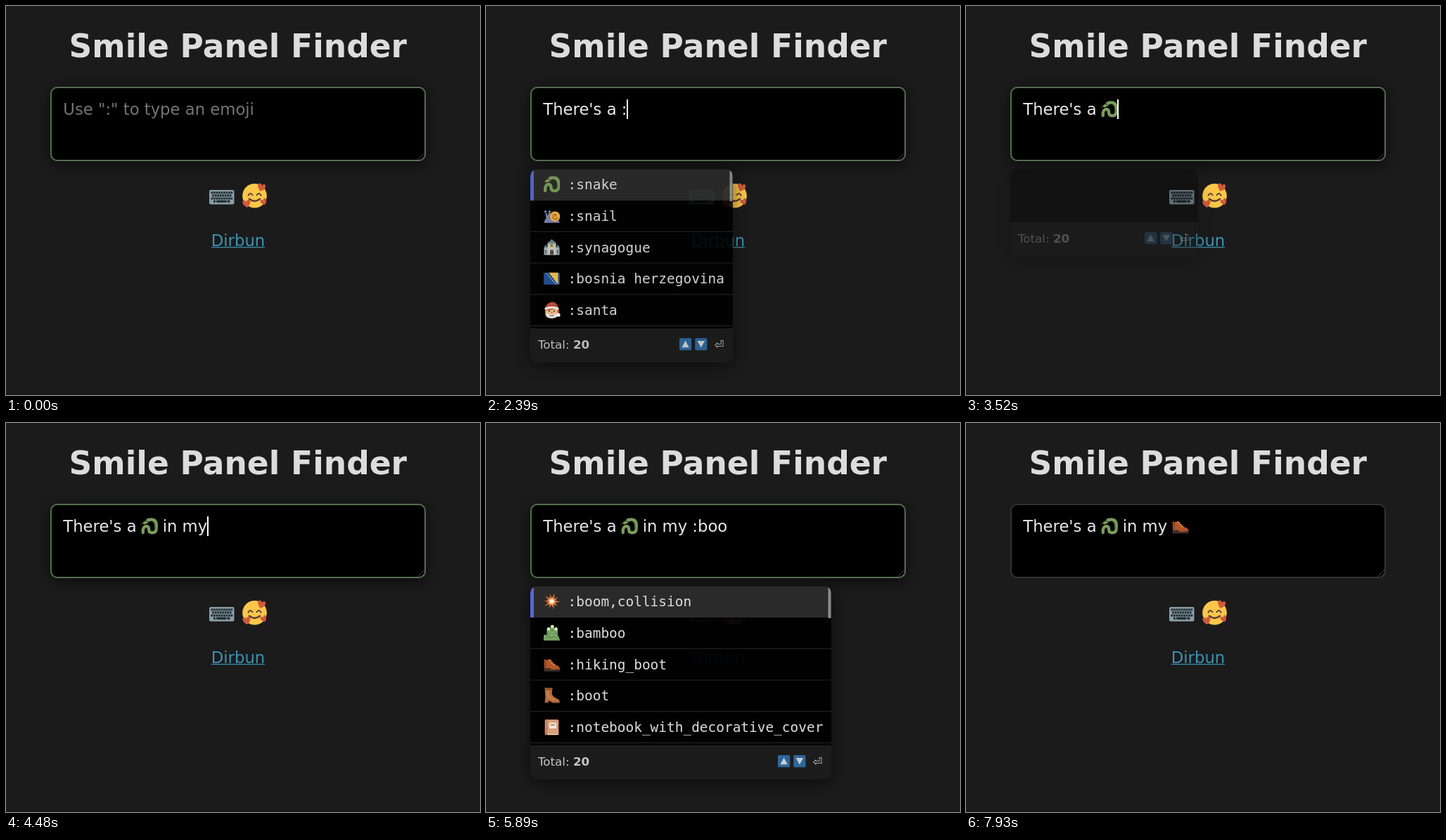
Write an HTML page that moves like this. It is 674 px wide and 554 px high and loops after 7980 ms.

```html
<!DOCTYPE html>
<html lang="en">
<head>
<meta charset="utf-8">
<title>Smile Panel Finder</title>
<style>
html, body { margin: 0; width: 100%; height: 100%; overflow: hidden; background: #1b1b1b; }
svg { display: block; width: 674px; height: 554px; }
text { font-family: "DejaVu Sans", sans-serif; white-space: pre; }
.field { font-size: 22.72px; }
.mono { font: 19.45px "DejaVu Sans Mono", monospace; fill: #dcdcdc; }
.foot { font-size: 16.7px; fill: #c6c6c6; }
</style>
</head>
<body>
<svg viewBox="0 0 674 554">
  <defs id="defs">
    <filter id="shadow" x="-20%" y="-40%" width="140%" height="190%">
      <feDropShadow dx="0" dy="4" stdDeviation="11.5" flood-color="#000" flood-opacity=".6"/>
    </filter>
    <path id="heart" d="M0 5.8 C-8 0 -6 -6 -2.5 -5 Q-.5 -4.5 0 -2.5 Q.5 -4.5 2.5 -5 C6 -6 8 0 0 5.8Z"/>
  </defs>
  <rect width="674" height="554" fill="#1b1b1b"/>
  <rect y="552" width="674" height="2" fill="#181818"/>
  <text x="329.8" y="72.5" text-anchor="middle" font-size="45.5" font-weight="bold" fill="#dcdcdc">Smile Panel Finder</text>

  <rect id="box" x="64" y="116" width="532" height="104" rx="9" fill="#000" stroke-width="2"/>
  <path d="M585 219 L596 208 M590.5 219 L596 213.5" stroke="#484848" stroke-width=".9"/>
  <text id="hint" class="field" x="81.3" y="155" fill="#757575">Use ":" to type an emoji</text>
  <g id="typed"></g>
  <rect id="caret" y="133" width="2" height="28" fill="#fff"/>

  <g id="keyboard"></g>
  <g transform="translate(353.5 270.3)">
    <circle r="17.3" fill="#fcc748"/>
    <g fill="none" stroke="#5d4037" stroke-width="2" stroke-linecap="round">
      <path d="M-9 -.5 Q-6.3 -6 -3 -1 M3 -1 Q6.3 -6 9 -.5"/>
      <path d="M-7.5 4.5 Q0 10.5 7.5 4.5" stroke-width="2.6"/>
    </g>
    <g fill="#d05a3c">
      <use href="#heart" transform="translate(9.7 -12) rotate(14)"/>
      <use href="#heart" transform="translate(-11.2 11) rotate(-8)"/>
      <use href="#heart" transform="translate(13 8.5) rotate(-24) scale(.8)"/>
    </g>
  </g>
  <text class="field" x="330" y="342" text-anchor="middle" fill="#3c93b4">Dirbun</text>
  <rect x="292" y="343" width="76" height="1.2" fill="#3c93b4"/>
  <g id="popup" filter="url(#shadow)"></g>
</svg>
<script>
const LOOP = 7980;
const $ = id => document.getElementById(id);
const clamp = (v, lo, hi) => Math.min(hi, Math.max(lo, v));
const rect = (x, y, w, h, fill, more = '') =>
  `<rect x="${x}" y="${y}" width="${w}" height="${h}" fill="${fill}" ${more}/>`;
const path = (d, fill, more = '') => `<path d="${d}" fill="${fill}" ${more}/>`;
const dot = (x, y, r, fill) => `<circle cx="${x}" cy="${y}" r="${r}" fill="${fill}"/>`;
const line = (d, color, width, more = '') =>
  path(d, 'none', `stroke="${color}" stroke-width="${width}" stroke-linecap="round" stroke-linejoin="round" ${more}`);

function burst(points, outer, inner) {
  let d = '';
  for (let i = 0; i < points * 2; i++) {
    const r = i % 2 ? inner : outer * (i % 4 ? .86 : 1);
    const a = i * Math.PI / points - 1.2;
    d += (i ? 'L' : 'M') + (r * Math.cos(a)).toFixed(1) + ' ' + (r * Math.sin(a)).toFixed(1);
  }
  return d + 'Z';
}

// Each icon is drawn around its centre, about 24 units wide.
const icons = {
  snake: line('M-9.3 9 C-10 2 -7 0 -4.5 0 Q-1 0 -1 4.5 Q-1 9.3 4 9.3 Q9.6 9.3 9.6 3 V-2 C9.6 -7 7 -9.5 2 -9.5 Q-3 -9.5 -4 -6.5', '#7a9c5c', 4.3) +
    line('M-4 -6 L-7.5 -4.5', '#7a9c5c', 3.6) +
    line('M8 5 Q9.5 -6 2 -8', '#55723f', 1) + dot(-4, -7, .9, '#222') + line('M-9.5 -4 L-11.5 -3', '#b5432e', 1),
  snail: path('M-11 10 Q-10 5 -8 4 L-9 -4 L-7 -4 L-6 0 L-4 -5 L-2 -4 L-3 4 L10 7 Q12 9 10 10Z', '#7b84b4') +
    dot(-9, -6, 1.6, '#8c95c4') + dot(-3, -6, 1.6, '#8c95c4') + dot(4.5, 1, 7.3, '#f0b04a') +
    line('M8 3 Q5 7 2 3 Q1 -2 5 -2 Q7 -1 5 1', '#a8682a', 1.4),
  temple: rect(-11, 0, 22, 11, '#a9b2b8') + path('M-6 11 V-6 L0 -11 L6 -6 V11Z', '#c5c9c8') +
    path('M-11 0 L-8.5 -4 L-6 0Z M6 0 L8.5 -4 L11 0Z M-6 -5 L0 -11.5 L6 -5Z', '#66818e') +
    dot(0, -2.5, 3, '#d8b95a') + dot(0, -2.5, 1.6, '#4a6687') +
    path('M-2.5 11 V5 Q0 2 2.5 5 V11Z', '#5c4a3d') + rect(-9.5, 4, 2.2, 5, '#54707e') + rect(7.3, 4, 2.2, 5, '#54707e'),
  flag: rect(-11.5, -8.5, 23, 17, '#264f92', 'rx="1.5"') + path('M-4 -8.5 H9 V8.5Z', '#f3c544') +
    line('M-7 -7 L6 8', '#e3e6ea', 1.2, 'stroke-dasharray=".5 2.6"'),
  santa: dot(0, 2, 9.3, '#f4c28c') + path('M-10 1 Q-9 -11 2 -11.5 Q10 -10 11 6 L8 6 L8 -2Z', '#c2513a') +
    path('M-9 4 Q-5 7 0 5 Q5 7 9 4 Q10 11 0 12 Q-10 11 -9 4Z', '#f1ece6') +
    line('M-8.5 -2 Q0 -5.5 8.5 -2', '#f5f1ec', 3.2) + dot(9.5, 7, 2.6, '#fff') +
    dot(-3.5, 1.5, 1.1, '#40302a') + dot(3.5, 1.5, 1.1, '#40302a') + dot(0, 4, 1.5, '#d88b66') +
    line('M-2.5 7.5 Q0 9 2.5 7.5', '#9a4d3c', 1.2),
  boom: path(burst(10, 12.5, 5.6), '#bb5a30') + path(burst(10, 8.2, 3.8), '#ec9a55') + path(burst(8, 4.8, 2.4), '#fff5df'),
  bamboo: path('M-11.5 11 V4 Q-9 1 -7 4 V-5 Q-4.5 -8 -2 -5 V-9 Q.8 -12 3.5 -9 V-5 Q6 -8 8.5 -5 V4 Q10.5 5 11.5 11Z', '#79a465') +
    [[-4.5, -5.5], [.8, -9], [6, -5.5]].map(([x, y]) => dot(x, y, 2.3, '#dfe8bd')).join('') +
    line('M-6 1 h3 M-1 -3 h3.5 M5 1 h3 M-9 8 Q-5 3 -1 8 Q3 3 8 8', '#4e7a43', 1),
  hiking: path('M-11 -7 Q-7 -5 -3 -7.5 L1 -2.5 Q5 1.5 9 2.5 Q12 4 11.5 8 L-10.5 8Z', '#b2562a') +
    path('M-11 5.5 L-3 5.5 L0 8 L11.8 7 V10.2 H-11Z', '#42302b') +
    line('M-3 -4.5 L-.8 -5.4 M-.8 -1.8 L1.4 -2.6 M2 1 L4 -.2', '#e8b06c', 1.1) + line('M-9 -5.5 L-8.5 4', '#7e3f24', 1.5),
  boot: path('M-10 -11 H1 L0 -2 Q3 3 9 5 Q12 7 11 10 L1 10 L-4 7 L-5 10 H-10 L-9 2Z', '#b8703c') +
    line('M-9 -9 H0', '#8a4a27', 2) + line('M-9.5 10 H-5.5 M1 10.2 H11', '#543127', 1.6) + line('M-6 -6 L-5 2 Q0 3 3 6', '#d6935a', 1.1),
  notebook: rect(-10, -11, 20, 22.5, '#a0593a', 'rx="2"') + rect(-6.5, -10, 16, 20, '#d8a17d', 'rx="1"') +
    rect(-3.5, -6, 10, 8, '#f2e7d8', 'rx="1"') + rect(-1.5, -4, 6, 2, '#b48a72') +
    line('M-8.3 -10 V10', '#e6c5a4', 1.2) + line('M-6 10.5 H9', '#f1e8dc', 1.2)
};
$('defs').insertAdjacentHTML('beforeend',
  Object.entries(icons).map(([name, art]) => `<g id="${name}">${art}</g>`).join(''));
const icon = (name, x, y) => `<use href="#${name}" x="${x}" y="${y}"/>`;

function keyboard() {
  const ink = '#263238';
  let s = rect(289, 262, 35.5, 20.5, '#8b9ea8', 'rx="2"');
  for (let r = 0; r < 3; r++)
    for (let c = 0; c < 9 - r % 2; c++)
      s += rect(291.4 + c * 3.5 + r % 2 * 1.7, 264.2 + r * 4.1, 2.9, 3.3, ink, 'rx=".7"');
  return s + rect(295, 276.6, 3, 3.3, ink, 'rx=".7"') + rect(299, 276.6, 14.5, 3.3, ink, 'rx=".7"') +
    rect(314.5, 276.6, 4, 3.3, ink, 'rx=".7"');
}
$('keyboard').innerHTML = keyboard();

const snakes = { width: 288, rows: [['snake', 'snake'], ['snail', 'snail'], ['temple', 'synagogue'],
  ['flag', 'bosnia herzegovina'], ['santa', 'santa']] };
const boots = { width: 428, rows: [['boom', 'boom,collision'], ['bamboo', 'bamboo'], ['hiking', 'hiking_boot'],
  ['boot', 'boot'], ['notebook', 'notebook_with_decorative_cover']] };
const empty = { width: 267, rows: [] };

function panel({ width, rows }, chosen) {
  const top = 232.3, left = 63, right = left + width, rowH = 44.75;
  const split = rows.length ? 459 : 308, mid = split + 23;
  let s = `<clipPath id="round">${rect(left, top, width, split + 48.5 - top, '#000', 'rx="10"')}</clipPath>
    <g clip-path="url(#round)">` + rect(left, top, width, split - top, '#000', 'opacity=".9"') +
    rect(left, split, width, 50, '#1c1c1c');
  rows.forEach(([name, label], i) => {
    const y = top + i * rowH;
    if (i === chosen) s += rect(left, y, width, rowH, '#292929') + rect(left, y, 5, rowH, '#5868d2');
    else s += rect(left, y + rowH - 1, width, 1, '#262626');
    s += icon(name, 93.5, y + 21.7) + `<text class="mono" x="116.6" y="${y + 28.7}">:${label}</text>`;
  });
  if (rows.length) s += rect(right - 4.5, 233.5, 4, 44.5, '#8a8a86', 'rx="1"');
  s += `<text class="foot" x="74" y="${mid + 6}">Total: <tspan font-weight="bold">20</tspan></text>`;
  [[right - 76, 1], [right - 53.7, -1]].forEach(([x, dir]) => {
    const cx = x + 8.6, cy = mid - .4;
    s += rect(x, mid - 9, 17.2, 17.2, '#2f6699', 'rx="1.5"') +
      path(`M${cx} ${cy - 5 * dir} L${cx + 5.2} ${cy + 4.6 * dir} H${cx - 5.2}Z`, '#c9cdd0');
  });
  return s + `<text class="foot" x="${right - 26.5}" y="${mid + 6}">\u23ce</text></g>`;
}

// Typing: [time, text from that time on]; S and B stand for the two inline icons.
const typing = [[0, '']];
function type(str, times) {
  let text = typing.at(-1)[1];
  [...str].forEach((ch, i) => typing.push([times[i], text += ch]));
}
type("There's a :sna", [640, 700, 770, 1060, 1310, 1400, 1480, 1680, 1810, 2230, 2270, 2420, 2480, 2850]);
typing.push([3430, "There's a S"]);
type(' in my :boo', [3890, 4100, 4190, 4340, 4340, 4480, 4640, 5060, 5190, 5310, 5390]);
typing.push([6350, "There's a S in my B"]);

const caretOff = [[0, 480], [3230, 3430], [5890, 6060], [7060, 7390], [7930, LOOP]];
const popups = [
  { open: 2270, close: 3430, gone: 3600, list: snakes, floor: 0 },
  { open: 5060, close: 6350, gone: 7060, list: boots, floor: .1, pick: 6060 }
];

const pen = document.createElement('canvas').getContext('2d');
pen.font = '22.72px "DejaVu Sans", sans-serif';
const inline = { S: 'snake', B: 'hiking' };

function setText(str) {
  let x = 81.3, s = '';
  for (const part of str.split(/([SB])/)) {
    if (inline[part]) {
      s += icon(inline[part], x + 11.3, 147);
      x += 22.6;
    } else if (part) {
      s += `<text class="field" x="${x}" y="155" fill="#e8e8e8">${part}</text>`;
      x += pen.measureText(part).width;
    }
  }
  $('typed').innerHTML = s;
  $('caret').setAttribute('x', Math.round(x - .4));
  $('hint').style.display = str ? 'none' : '';
}

let shownText = null, shownPanel = null;
function draw(t) {
  const text = typing.findLast(([at]) => at <= t)[1];
  if (text !== shownText) setText(shownText = text);

  const focused = t < 7930;
  $('box').setAttribute('stroke', focused ? '#526f4e' : '#333');
  $('box').setAttribute('filter', focused ? 'url(#shadow)' : 'none');
  $('caret').style.display = caretOff.some(([a, b]) => t >= a && t < b) ? 'none' : '';

  const p = popups.find(p => t >= p.open && t < p.gone);
  $('popup').style.display = p ? '' : 'none';
  if (!p) return;
  const closing = t >= p.close;
  const list = closing ? empty : p.list;
  const chosen = t >= p.pick ? 2 : 0;
  const key = list.width + ':' + chosen;
  if (key !== shownPanel) {
    shownPanel = key;
    $('popup').innerHTML = panel(list, chosen);
  }
  $('popup').style.opacity = closing
    ? clamp(1 - (t - p.close + 15) / 155, p.floor, 1)
    : clamp((t - p.open + 30) / 160, 0, 1);
}

const start = performance.now();
function tick() {
  draw((performance.now() - start) % LOOP);
  requestAnimationFrame(tick);
}
tick();
</script>
</body>
</html>
```
